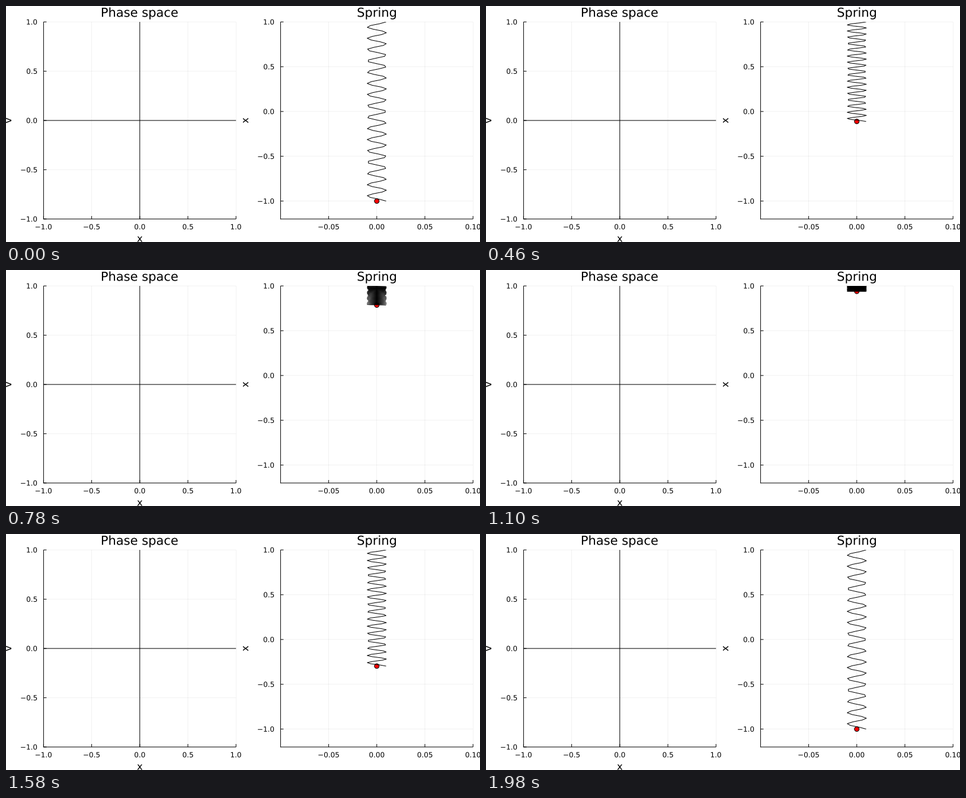
A matplotlib script that plays this animation: 800 by 400 pixels, repeating every 2000 ms.

```python
import numpy as np
import matplotlib.pyplot as plt
from matplotlib.animation import FuncAnimation
from matplotlib.patches import Circle, PathPatch, Rectangle
from matplotlib.textpath import TextPath
from matplotlib.transforms import Affine2D

W, H, DPI = 800, 400, 100
PX = 72 / DPI  # one pixel in points
FRAMES, INTERVAL = 100, 20
TOP, BOTTOM = 27, 361

plt.rcParams.update({"font.family": "DejaVu Sans", "path.simplify": False})

fig = plt.figure(figsize=(W / DPI, H / DPI), dpi=DPI, facecolor="white")
stage = fig.add_axes([0, 0, 1, 1])
stage.set(xlim=(0, W), ylim=(H, 0))
stage.axis("off")


def line(xs, ys, **style):
    style = {"color": "black", "lw": PX, "solid_capstyle": "butt",
             "snap": False, **style}
    return stage.plot(xs, ys, **style)[0]


def grid_line(xs, ys):
    line(xs, ys, alpha=0.1, lw=0.5 * PX, zorder=1)


def label(x, y, text, size, align=0.5, angle=0):
    """Outline text on a baseline; align runs from 0 (left) to 1 (right)."""
    path = TextPath((0, 0), text, size=size)
    box = path.get_extents()
    place = (Affine2D().translate(-box.x0 - align * box.width, 0)
             .scale(1, -1).rotate_deg(-angle).translate(x, y))
    stage.add_patch(PathPatch(place.transform_path(path), fc="black", lw=0,
                              snap=False, zorder=6))


def number(v, digits):
    return f"{v:.{digits}f}".replace("-", "−")


class Panel:
    def __init__(self, left, right, xlim, ylim):
        self.left, self.right = left, right
        self.xlim, self.ylim = xlim, ylim

    def x(self, v):
        return np.interp(v, self.xlim, (self.left, self.right))

    def y(self, v):
        lo, hi = self.ylim
        return BOTTOM + (v - lo) / (hi - lo) * (TOP - BOTTOM)

    def draw(self, title, ylabel, xticks, yticks, digits):
        for v in xticks:
            x = self.x(v)
            grid_line([x, x], [TOP, BOTTOM])
            line([x, x], [BOTTOM, BOTTOM - 5], zorder=2)
            label(x, 378.5, number(v, digits), 12)
        for v in yticks:
            y = self.y(v)
            grid_line([self.left, self.right], [y, y])
            line([self.left, self.left + 5], [y, y], zorder=2)
            label(self.left - 11.2, y + 4.4, number(v, 1), 12, align=1)
        line([self.left] * 2, [TOP, BOTTOM + 0.5], zorder=2)
        line([self.left, self.right], [BOTTOM] * 2, zorder=2)
        label((self.left + self.right) / 2, 18.3, title, 21)
        label(self.left - 54.4, (TOP + BOTTOM) / 2, ylabel, 16.5, angle=90)


phase = Panel(63.4, 388.2, (-1, 1), (-1, 1))
phase.draw("Phase space", "v", np.linspace(-1, 1, 5), np.linspace(-1, 1, 5), 1)
line([phase.x(0)] * 2, [TOP, BOTTOM], zorder=3)
line([phase.left, phase.right], [phase.y(0)] * 2, zorder=3)
label(phase.x(0), 399.6, "x", 16.5)

spring = Panel(463.4, 788.2, (-0.1, 0.1), (-1.2, 1))
spring.draw("Spring", "x", [-0.05, 0, 0.05, 0.1], np.linspace(-1, 1, 5), 2)

window = Rectangle((spring.left, TOP), spring.right - spring.left,
                   BOTTOM - TOP, transform=stage.transData)
mass = Circle((spring.x(0), 0), 3.95, fc="red", ec="black", lw=PX, zorder=4)
stage.add_patch(mass)
mass.set_clip_path(window)

coil_x = spring.x(0.01 * np.cos(np.linspace(-50, 50, 100)))
coil = line(coil_x, np.zeros(100), zorder=5)
coil.set_clip_path(window)


def update(i):
    pos = -np.cos(2 * np.pi * i / (FRAMES - 1))
    mass.center = (spring.x(0), spring.y(pos))
    coil.set_ydata(spring.y(np.linspace(pos, 1, 100)))
    return mass, coil


anim = FuncAnimation(fig, update, frames=FRAMES, interval=INTERVAL,
                     repeat=True, repeat_delay=0)
plt.show()
```
